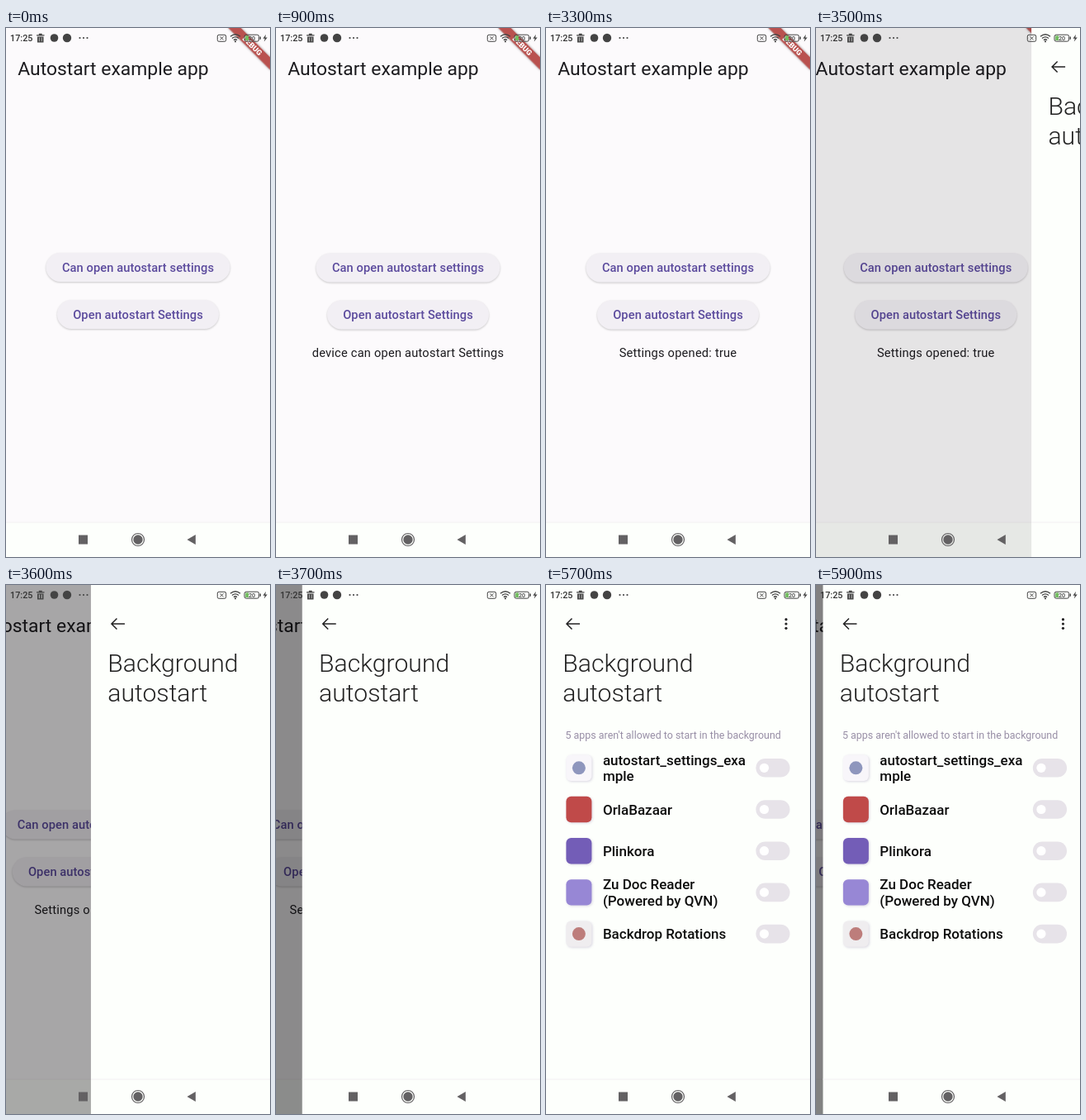
Animation, 320 px wide and 640 px high, one loop 6 s. Source, as an HTML page:

```html
<!DOCTYPE html>
<html lang="en">
<head>
<meta charset="utf-8">
<title>Autostart example app</title>
<style>
  html, body { margin: 0; width: 100%; height: 100%; overflow: hidden; background: #fcfafc; }
  svg { display: block; width: 100%; height: 100%; font-family: Roboto, sans-serif; }
  .label { font-size: 14.67px; font-weight: 500; letter-spacing: .08px; fill: #5b4a9d; text-anchor: middle; }
  .pill { fill: #f2eff4; filter: drop-shadow(0 1px .8px rgba(0, 0, 0, .2)); }
  #message { font-size: 14.67px; letter-spacing: .2px; text-anchor: middle; fill: #1c1b1f; }
  .heading { font-size: 30.2px; font-weight: 300; fill: #222; }
  .app { font-size: 17px; font-weight: 500; fill: #0c0c0c; }
  .tile { filter: drop-shadow(1px 1.5px 1.5px rgba(90, 70, 130, .22)); }
  .line { fill: none; stroke: #444; }
</style>
</head>
<body>
<svg viewBox="0 0 320 640">
  <defs>
    <radialGradient id="glow" gradientUnits="userSpaceOnUse" cx="0" cy="0" r="100">
      <stop offset="0" stop-color="#6750a4" stop-opacity=".18"/>
      <stop offset=".4" stop-color="#6750a4" stop-opacity=".16"/>
      <stop offset=".75" stop-color="#6750a4" stop-opacity=".07"/>
      <stop offset="1" stop-color="#6750a4" stop-opacity=".06"/>
    </radialGradient>
  </defs>

  <g id="home">
    <rect width="320" height="640" fill="#fcfafc"/>
    <rect y="598" width="320" height="42" fill="#fdfffc"/>
    <path d="M0 598H320" stroke="#f2f0f2"/>
    <text x="14.3" y="57" font-size="22.9" fill="#1c1b1f">Autostart example app</text>
    <g id="buttons"></g>
    <text id="message" x="160" y="398"></text>
    <g transform="translate(320 0) rotate(45)">
      <rect x="-36" y="24.9" width="72" height="10.7" fill="#b9514f"
            style="filter: drop-shadow(0 0 1.5px rgba(0, 0, 0, .4))"/>
      <text y="33.5" font-size="9.07" font-weight="900" fill="#fff" text-anchor="middle">DEBUG</text>
    </g>
  </g>
  <rect id="dim" width="320" height="640"/>

  <g id="settings">
    <rect width="320" height="640" fill="#fdfffc"/>
    <path d="M0 598H320" stroke="#f2f0f2"/>
    <path class="line" style="stroke: #222" stroke-width="1.5" d="M41 47H25M31.5 40.5L25 47L31.5 53.5"/>
    <text class="heading" x="20.3" y="105">Background</text>
    <text class="heading" x="20.3" y="141">autostart</text>
    <g id="list">
      <g fill="#222">
        <circle cx="291" cy="41.7" r="1.6"/><circle cx="291" cy="47" r="1.6"/><circle cx="291" cy="52.3" r="1.6"/>
      </g>
      <text x="23.5" y="186.3" font-size="12.45" fill="#988ea6">5 apps aren't allowed to start in the background</text>
    </g>
  </g>

  <g id="status" fill="#444">
    <text x="5" y="16" font-size="10.8" font-weight="500" fill="#333">17:25</text>
    <path d="M37 8.2H46.5V9.6H37ZM39.8 6.8H43.7V8.2H39.8ZM38 10.4H45.5V17.5H38Z"/>
    <path d="M40.3 11.5V16.2M43.2 11.5V16.2" stroke="#ddd" stroke-width=".8"/>
    <circle cx="58.5" cy="12" r="4.8"/>
    <circle cx="74" cy="12" r="5.2"/>
    <circle cx="89.5" cy="12" r="1.1"/><circle cx="94" cy="12" r="1.1"/><circle cx="98.5" cy="12" r="1.1"/>
    <rect class="line" x="256.3" y="8.3" width="10.4" height="8" rx="1.8"/>
    <path class="line" d="M259.5 10.3L263.5 14.3M263.5 10.3L259.5 14.3"/>
    <path class="line" stroke-width="1.4" d="M272 10.3Q278 5.2 284 10.3M274 12.5Q278 9.2 282 12.5M276 14.7Q278 13 280 14.7"/>
    <circle cx="278" cy="16.3" r="1.1"/>
    <rect x="290.2" y="9.4" width="3.8" height="5.6" fill="#72bd60"/>
    <rect class="line" x="289" y="8.2" width="17.6" height="8" rx="2.2"/>
    <path d="M307.6 10.6H309V13.8H307.6Z"/>
    <text x="298" y="14.8" font-size="7.2" font-weight="500" text-anchor="middle">20</text>
    <path d="M315 7.8L311.5 12.8H313.8L312.8 16.6L316.8 11.4H314.3Z"/>
  </g>

  <g id="nav" fill="#636163">
    <rect x="88" y="613.5" width="11" height="11"/>
    <circle cx="160" cy="619" r="5.7"/>
    <circle cx="160" cy="619" r="7.5" fill="none" stroke="#636163" stroke-width="1.2"/>
    <path d="M219.5 619L229.8 613V625Z"/>
  </g>
</svg>
<script>
const LOOP = 6000, STEP = 100;
const TAP_CHECK = 100, TAP_OPEN = 2400, RIPPLE = 600;
const CHECKED = 800, OPENED = 3100, SLIDE_IN = 3450, LISTED = 3900, SLIDE_OUT = 5884;
const $ = id => document.getElementById(id);

const button = (label, y, width) => {
  const box = `x="${-width / 2}" y="-17.5" width="${width}" height="35" rx="17.5"`;
  return `<g transform="translate(160 ${y})"><rect class="pill" ${box}/>
    <rect class="ripple" ${box} fill="url(#glow)"/><text class="label" y="5">${label}</text></g>`;
};
$('buttons').innerHTML =
  button('Can open autostart settings', 290, 223) + button('Open autostart Settings', 347, 196);
const ripples = document.querySelectorAll('.ripple');

// lines of the name, tile colour, optional dot colour
const apps = [
  [['autostart_settings_exa', 'mple'], '#f8f6fa', '#8e96bd'],
  [['OrlaBazaar'], '#c04a49'],
  [['Plinkora'], '#735db7'],
  [['Zu Doc Reader', '(Powered by QVN)'], '#9787d5'],
  [['Backdrop Rotations'], '#efedef', '#bd7d7b']
];
$('list').innerHTML += apps.map(([lines, tile, dot], i) => {
  const top = lines.length > 1 ? -3.5 : 6.3;
  const name = lines.map((s, k) => `<text class="app" x="68.9" y="${top + k * 19.7}">${s}</text>`).join('');
  return `<g transform="translate(0 ${221.3 + i * 50.2})">
    <rect class="tile" x="24.4" y="-15.7" width="31" height="31.4" rx="6" fill="${tile}"/>
    ${dot ? `<circle cx="39.9" r="8" fill="${dot}"/>` : ''}${name}
    <rect x="254.4" y="-11.3" width="41.2" height="22.6" rx="11.3" fill="#e7e3e9"/>
    <circle cx="264.5" r="5.6" fill="#fff"/></g>`;
}).join('');

// critically damped spring from 0 to 1
const spring = ms => {
  const a = Math.max(0, ms) * 0.0156;
  return 1 - (1 + a) * Math.exp(-a);
};
const move = (id, x, y = 0) => $(id).setAttribute('transform', `translate(${x} ${y})`);

function draw(t) {
  [TAP_CHECK, TAP_OPEN].forEach((start, i) => {
    const k = (t - start) / RIPPLE, on = k >= 0 && k < 1;
    ripples[i].setAttribute('opacity', on ? 1 - k * k : 0);
    if (on) $('glow').setAttribute('r', 75 + 220 * k);
  });
  move('buttons', 0, t < CHECKED ? -0.5 : 0);
  $('message').textContent = t < CHECKED ? ''
    : t < OPENED ? 'device can open autostart Settings' : 'Settings opened: true';

  const p = spring(t - SLIDE_IN) - spring(t - SLIDE_OUT);
  move('home', -80 * p);
  move('settings', 320 * (1 - p));
  $('dim').setAttribute('opacity', p / 2);
  $('list').setAttribute('visibility', t < LISTED ? 'hidden' : 'visible');
}

const began = performance.now();
function tick() {
  const t = (performance.now() - began) % LOOP;
  draw(Math.floor(t / STEP) * STEP);
  requestAnimationFrame(tick);
}
tick();
</script>
</body>
</html>
```
